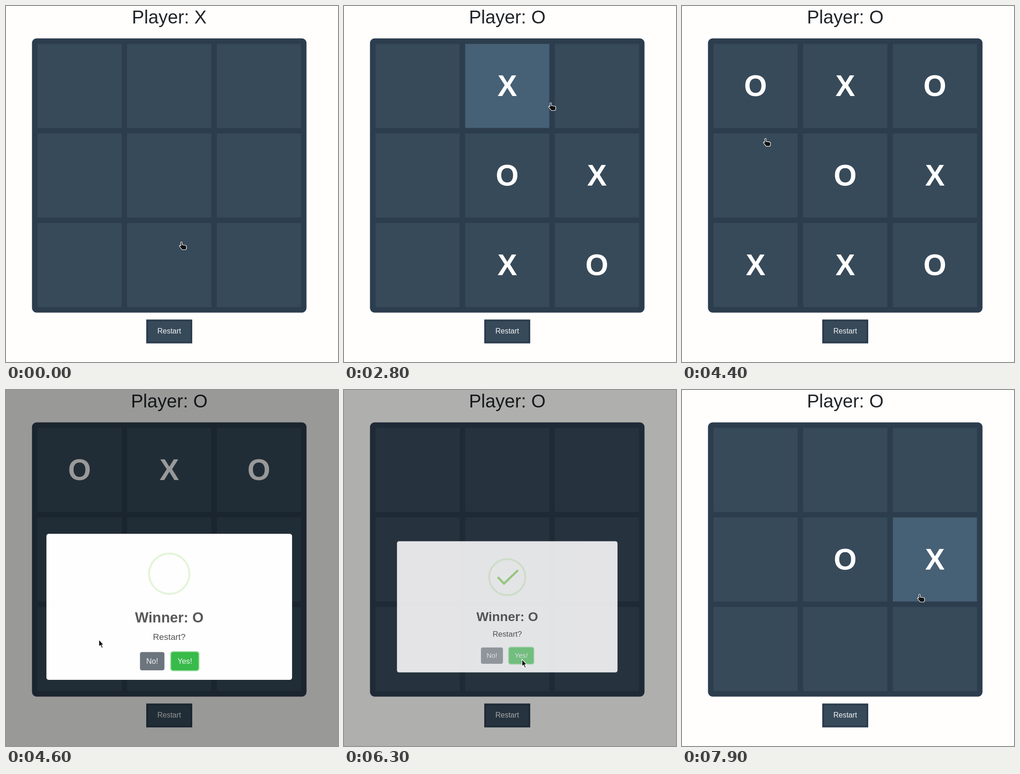
These frames come from a looping animation (722 px wide and 775 px high, 8 s). An HTML page:

```html
<!DOCTYPE html>
<html lang="en">
<head>
<meta charset="utf-8">
<title>Tic-tac-toe</title>
<style>
  html, body { margin: 0; width: 722px; height: 775px; overflow: hidden; background: #fffefd; }
  svg { display: block; }
  text { font-family: "Liberation Sans", Arial, sans-serif; text-anchor: middle; }
  .mark { font-size: 64px; font-weight: bold; fill: #fff; }
  .small { font-size: 16px; fill: #f4f4f4; }
</style>
</head>
<body>
<svg width="722" height="775" viewBox="0 0 722 775">
  <text id="player" x="355" y="38" font-size="40" fill="#212529"></text>
  <rect x="56.5" y="70.5" width="597" height="597" rx="10" fill="#2c3d4e"/>
  <g id="board"></g>
  <rect x="305" y="682.5" width="100" height="52" fill="#2c3d4e"/>
  <rect x="309" y="686.5" width="92" height="44" fill="#374a5a"/>
  <text class="small" x="355" y="713">Restart</text>
  <rect id="shade" width="722" height="775"/>
  <g id="popup">
    <rect x="-256" y="-152.5" width="512" height="305" rx="5" fill="#fffefe"/>
    <circle cy="-69" r="42" fill="none" stroke="#a5dc86" stroke-opacity=".3" stroke-width="4"/>
    <path id="check" d="M-22 -69L-7.5 -54L25 -85" pathLength="1" stroke-dasharray="1 2"
      fill="none" stroke="#a5dc86" stroke-width="5"/>
    <text y="33" font-size="30" font-weight="bold" fill="#595959">Winner: O</text>
    <text y="69" font-size="18" fill="#545454">Restart?</text>
    <g id="buttons">
      <rect x="-61" y="94.5" width="51" height="38" rx="4" fill="#6c757d"/>
      <text class="small" x="-35.5" y="119">No!</text>
      <rect x="2" y="92.5" width="61" height="42" rx="6" fill="#9de0a4"/>
      <rect x="4" y="94.5" width="57" height="38" rx="4" fill="#38bb4a"/>
      <text class="small" x="32.5" y="119">Yes!</text>
    </g>
  </g>
  <g id="cursor" fill="#111" stroke="#fff" stroke-width="1.2" stroke-linejoin="round">
    <path id="hand" d="M-2 1Q-2 -.5 -.5 -.5Q1 -.5 1 1V6L8 7Q10.5 7.5 10.5 9.5V13Q10 16.5 8 16.5H1Q-1 14 -4.5 9.5Q-5.5 7.5 -4 7.2Q-3 7 -2 8Z"/>
    <path id="arrow" d="M0 0V16L3.5 12.7L6.2 18.8L8.8 17.7L6.2 11.8H10.5Z"/>
  </g>
</svg>
<script>
const LOOP = 8000, STEP = 100, PITCH = 195;
const WIN = 4300, OPEN = 4476, CLOSE = 6281, HOVER_LAG = 200;
const CLICK = true;
const $ = id => document.getElementById(id);

// Pointer stops: time, x, y; a click plays the cell below it.
const stops = [
  [0, 382, 514], [500, 376, 522, CLICK], [900, 545, 560, CLICK],
  [1200, 500, 300, CLICK], [1900, 361, 313, CLICK], [2500, 400, 230, CLICK],
  [3100, 500, 192, CLICK], [3500, 520, 330], [3700, 410, 276],
  [4000, 150, 560, CLICK], [WIN, 175, 200, CLICK], [4600, 202, 543],
  [5200, 387, 586], [6300, 387, 586], [6800, 400, 368],
  [7100, 400, 368, CLICK], [7400, 547, 357, CLICK], [7600, 547, 357], [7900, 517, 445]
];
const bounce = [[0, 0.7], [0.45, 1.05], [0.8, 0.95], [1, 1]];

const clamp = v => Math.max(0, Math.min(1, v));
const smooth = u => u * u * (3 - 2 * u);
const span = (t, start, length) => clamp((t - start) / length);
const show = (el, on) => { el.style.display = on ? "" : "none"; };

// Eased values between the two keys around t.
function track(keys, t, size) {
  const next = keys.findIndex(k => k[0] > t);
  const b = keys.at(next), a = next < 0 ? b : keys[next - 1];
  const u = a === b ? 0 : smooth((t - a[0]) / (b[0] - a[0]));
  return Array.from({ length: size }, (_, i) => a[i + 1] + (b[i + 1] - a[i + 1]) * u);
}

function cellAt(x, y) {
  return Math.floor((x - 62.5) / PITCH) + 3 * Math.floor((y - 76.5) / PITCH);
}

function add(tag, attrs) {
  const el = document.createElementNS("http://www.w3.org/2000/svg", tag);
  for (const name in attrs) el.setAttribute(name, attrs[name]);
  return $("board").appendChild(el);
}

const cells = Array.from({ length: 9 }, (_, i) => {
  const x = 68.5 + PITCH * (i % 3), y = 82.5 + PITCH * Math.floor(i / 3);
  return {
    box: add("rect", { x, y, width: 183, height: 183 }),
    text: add("text", { class: "mark", x: x + 91.5, y: y + 113.5 })
  };
});

function drawBoard(t) {
  const marks = Array(9).fill("");
  let player = "X";
  for (const [time, x, y, click] of stops) {
    if (!click || time > t) continue;
    if ((time > CLOSE) === (t > CLOSE)) marks[cellAt(x, y)] = player;
    if (time !== WIN) player = player === "X" ? "O" : "X";
  }
  const blocked = t >= OPEN && t < CLOSE;
  const hover = blocked ? -1 : cellAt(...track(stops, Math.max(0, t - HOVER_LAG), 2));
  $("player").textContent = "Player: " + player;
  cells.forEach(({ box, text }, i) => {
    const lit = i === hover && marks[i] && i < 6;
    box.setAttribute("fill", lit ? "#466075" : "#374a5a");
    text.textContent = marks[i];
  });
}

function drawPopup(t) {
  const out = span(t, CLOSE, 150);
  const scale = track(bounce, span(t, OPEN, 300), 1)[0] * (1 - out / 2);
  $("shade").setAttribute("opacity", 0.4 * (span(t, OPEN, 100) - span(t, CLOSE, 90)));
  show($("popup"), t >= OPEN && out < 1);
  $("popup").setAttribute("opacity", 1 - out);
  $("popup").setAttribute("transform", `translate(355 472) scale(${scale})`);
  $("buttons").setAttribute("opacity", t < CLOSE ? 1 : 0.65);
  const drawn = smooth(span(t, OPEN + 400, 350));
  show($("check"), drawn > 0);
  $("check").setAttribute("stroke-dashoffset", 1 - drawn);
}

function drawCursor(t) {
  const arrow = t >= OPEN && t < CLOSE + 200;
  $("cursor").setAttribute("transform", `translate(${track(stops, t, 2)})`);
  show($("arrow"), arrow);
  show($("hand"), !arrow);
}

function frame() {
  const t = Math.floor(performance.now() % LOOP / STEP) * STEP;
  drawBoard(t);
  drawPopup(t);
  drawCursor(t);
  requestAnimationFrame(frame);
}
frame();
</script>
</body>
</html>
```
